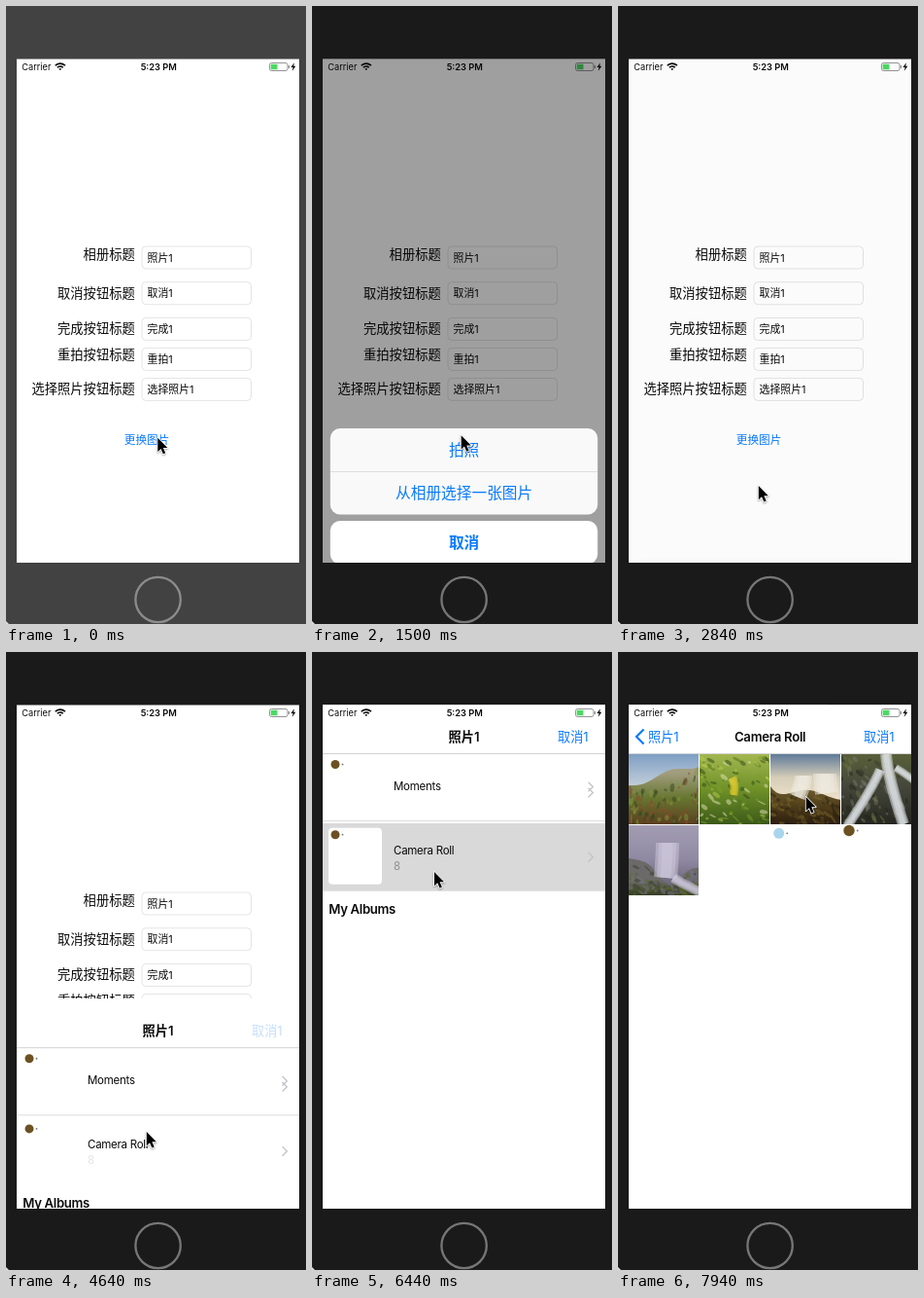
An HTML page with a canvas that plays this animation: 309 px wide and 635 px high, repeating every 8 s.

```html
<!DOCTYPE html>
<html lang="zh">
<head>
<meta charset="utf-8">
<style>
html, body { margin: 0; width: 100%; height: 100%; overflow: hidden; background: #1a1a1a; }
canvas { display: block; width: 309px; height: 635px; }
</style>
</head>
<body>
<canvas id="stage"></canvas>
<script>
const W = 309, H = 635, LOOP = 8000, STEP = 150;
const X0 = 11, Y0 = 54, SW = 291, SH = 518, MID = 156.6;
const CELL = 73, PIC = 72;
const BLUE = '#0a7aff', INK = '#0a0a0a';
const canvas = document.getElementById('stage');
const c = canvas.getContext('2d');
const dpr = window.devicePixelRatio || 1;
canvas.width = W * dpr;
canvas.height = H * dpr;

// Share of the way still to go, critically damped spring
function rest(ms) {
  if (ms <= 0) return 1;
  const w = 0.01826 * ms;
  return (1 + w) * Math.exp(-w);
}

// The screen refreshes in coarse steps
function tick(t) {
  const from = t < 2840 ? 0 : t < 4640 ? 2840 : 4640;
  return from === 2840 ? from : from + Math.floor((t - from) / STEP) * STEP;
}

const MOVES = [
  { at: 0, ms: 300, x: 153.7, y: 441.3 },
  { at: 1500, ms: 450, x: 144.8, y: 493 },
  { at: 4640, ms: 600, x: 130.5, y: 286.5 },
  { at: 5390, ms: 450, x: 126, y: 226 },
  { at: 7340, ms: 600, x: 193.7, y: 149 }
];

function pointerAt(t) {
  let x = 156.3, y = 443.8;
  for (const m of MOVES) {
    const p = Math.min(1, Math.max(0, (t - m.at) / m.ms));
    const e = p * p * (3 - 2 * p);
    x += (m.x - x) * e;
    y += (m.y - y) * e;
  }
  return [x, y];
}

function text(s, x, y, size, { color = INK, weight = 400, align = 'left', gap = 0, alpha = 1 } = {}) {
  c.save();
  c.globalAlpha *= alpha;
  c.font = `${weight} ${size}px Inter, "Noto Sans CJK SC", "Noto Sans CJK", sans-serif`;
  c.letterSpacing = gap + 'px';
  c.textAlign = align;
  c.fillStyle = color;
  c.fillText(s, x, y + size * 0.37);
  c.restore();
}

function rect(x, y, w, h, color) {
  c.fillStyle = color;
  c.fillRect(x, y, w, h);
}

function card(x, y, w, h, r, fill, stroke) {
  c.beginPath();
  c.roundRect(x, y, w, h, r);
  if (fill) {
    c.fillStyle = fill;
    c.fill();
  }
  if (stroke) {
    c.strokeStyle = stroke;
    c.lineWidth = 0.9;
    c.stroke();
  }
}

function disc(x, y, r, color) {
  c.beginPath();
  c.arc(x, y, r, 0, 7);
  c.fillStyle = color;
  c.fill();
}

function arc(x, y, r, a, b, width, color) {
  c.beginPath();
  c.arc(x, y, r, a, b);
  c.lineWidth = width;
  c.strokeStyle = color;
  c.stroke();
}

function trace(pts) {
  c.beginPath();
  for (let i = 0; i < pts.length; i += 2) c.lineTo(pts[i], pts[i + 1]);
}

function poly(color, ...pts) {
  trace(pts);
  c.fillStyle = color;
  c.fill();
}

// An angle bracket: dir 1 points right, -1 left
function chevron(x, y, size, dir, width, color) {
  trace([x - dir * size, y - size, x, y, x - dir * size, y + size]);
  c.strokeStyle = color;
  c.lineWidth = width;
  c.stroke();
}

function seeded(n) {
  return () => (n = (n * 16807) % 2147483647) / 2147483647;
}

function device(active) {
  rect(0, 0, W, H, active ? '#1a1a1a' : '#424242');
  arc(MID, 610, 23.2, 0, 7, 2.3, active ? '#777' : '#8c8c8c');
  poly('#ddd', 0, H - 3, 3, H, 0, H);
}

function statusBar() {
  text('Carrier', 16.3, 62.5, 9.2);
  text('5:23 PM', MID + 0.7, 62.5, 9.3, { weight: 600, align: 'center' });
  for (const r of [1, 4, 6.9]) arc(55.8, 66, r, -Math.PI * 0.76, -Math.PI * 0.24, 1.7, INK);
  card(271.5, 58.5, 18.5, 8, 2, null, '#8a8a8a');
  rect(272.7, 59.7, 6.8, 5.6, '#4cd964');
  rect(290.8, 61, 1.2, 3, '#8a8a8a');
  poly(INK, 297, 58.3, 293.4, 63, 295.6, 63, 294.8, 66.8, 298.4, 61.8, 296.2, 61.8);
}

const FIELDS = [
  { label: '相册标题', value: '照片1', lift: 3.5 },
  { label: '取消按钮标题', value: '取消1', lift: 0 },
  { label: '完成按钮标题', value: '完成1', lift: 1 },
  { label: '重拍按钮标题', value: '重拍1', lift: 4.5 },
  { label: '选择照片按钮标题', value: '选择照片1', lift: 1 }
];

function form(pressed) {
  rect(X0, Y0, SW, SH, '#fff');
  let y = 258.5;
  FIELDS.forEach(({ label, value, lift }, i) => {
    text(label, 132.8, y - lift, 13.3, { align: 'right' });
    card(140, y - 11.5, 112.5, 23, 4, null, 'rgba(0,0,0,.12)');
    text(value, 145.5, y, 10.9);
    y += i < 2 ? 36.7 : 31;
  });
  text('更换图片', 121.8, 446, 11.65, { color: BLUE, alpha: pressed ? 0.2 : 1 });
}

function sheet(shift, pressed) {
  const x = 18.8, w = 275.4, row = 44.2, top = 425 + shift;
  card(x, top, w, row * 2, 10, '#f9f9f9');
  if (pressed) card(x, top + row, w, row, [0, 0, 10, 10], '#e6e6e6');
  rect(x, top + row, w, 0.8, '#d6d6d8');
  card(x, top + 95, w, row, 10, '#fff');
  const style = { color: BLUE, align: 'center' };
  text('拍照', MID, top + 22, 15.7, style);
  text('从相册选择一张图片', MID, top + 22 + row, 15.7, style);
  text('取消', MID, top + 117, 15.7, { ...style, weight: 600 });
}

function avatar(x, y, r, color) {
  disc(x, y, r, color);
  disc(x + r + 3, y, 0.9, '#777');
}

function album(y, name) {
  card(17, y + 5, 55, 58, 4, '#fff');
  avatar(24, y + 12, 4.5, '#6b5122');
  text(name, 84, y + 28, 11.5, { gap: -0.27 });
  chevron(289.4, y + 35, 4.8, 1, 1.3, '#c3c3c8');
}

function albums(picked, shown) {
  rect(X0, Y0, SW, SH, '#fff');
  rect(X0, 173.2, SW, 0.9, '#d8d8da');
  if (picked) rect(X0, 176, SW, 69.7, '#d9d9d9');
  album(103.5 + 6, '');
  album(103.5, '');
  rect(X0, 105, SW, 0, '#fff');
  text('Moments', 84, 137.7, 11.5, { gap: -0.27 });
  album(175.7, 'Camera Roll');
  text('8', 84, 219.7, 11.5, { color: '#929292', alpha: shown });
  text('My Albums', 17.3, 264, 13.2, { weight: 600, gap: -0.35 });
}

function fillDown(colors, top) {
  const g = c.createLinearGradient(0, top, 0, PIC);
  colors.forEach((s, i) => g.addColorStop(i / (colors.length - 1), s));
  c.fillStyle = g;
  c.fill();
}

// Sky, streams of water as soft strokes, and land below a ridge with seeded dabs
function scene({ sky, land, ridge, dabs, seed, lean = 0, streams = [], foam }) {
  c.beginPath();
  c.rect(0, 0, PIC, PIC);
  fillDown(sky, 0);
  c.beginPath();
  c.moveTo(0, PIC);
  for (let x = 0; x <= PIC; x += 3) c.lineTo(x, ridge(x));
  c.lineTo(PIC, PIC);
  fillDown(land, ridge(PIC / 2));
  const r = seeded(seed);
  c.globalAlpha = 0.5;
  for (let i = 0; i < 90; i++) {
    const x = r() * PIC, top = ridge(x) + 3;
    c.beginPath();
    c.ellipse(x, top + r() * (PIC - top), 1 + r() * 4, 0.7 + r() * 1.6, lean + r(), 0, 7);
    c.fillStyle = dabs[i % dabs.length];
    c.fill();
  }
  c.strokeStyle = foam;
  for (const [x, y, bend, dx, dy, width] of streams) {
    for (const k of [1, 0.75, 0.45]) {
      c.beginPath();
      c.moveTo(x, y);
      c.quadraticCurveTo(x + bend, y + dy / 3, x + dx, y + dy);
      c.lineWidth = width * k;
      c.stroke();
    }
  }
  c.globalAlpha = 1;
}

const SCENES = [
  {
    sky: ['#7f9fc4', '#c9d3dc', '#dcd9cc'], land: ['#a29d80', '#66762f', '#5c3f20'],
    ridge: x => 32 - x * 0.3 + 3 * Math.sin(x / 9),
    dabs: ['#84963f', '#35461f', '#8a4a2c'], seed: 41, lean: 1.2
  },
  {
    sky: ['#b9c765', '#6f8f2a'], land: ['#a3b750', '#6f9128', '#3c5a19'],
    ridge: () => 0,
    dabs: ['#4e721b', '#b5cb4c', '#2f4816', '#e2e6b4', '#7fa02c'], seed: 97,
    streams: [[34, 24, 3, 1, 18, 9]], foam: '#dcc82c'
  },
  {
    sky: ['#5f7b99', '#d6cdb8', '#efe3cb', '#cfc8b8'], land: ['#6a5a2e', '#4d3a18', '#2c1f0e'],
    ridge: x => 42 + 5 * Math.cos(x / 12) - 14 * Math.exp(-x / 9),
    dabs: ['#7d6a2c', '#2a2110', '#5c4a1e'], seed: 23,
    streams: [[34, 22, 0, -6, 22, 18], [56, 20, 0, 2, 20, 24]], foam: '#f0ece2'
  },
  {
    sky: ['#4b5233', '#29281f'], land: ['#59603a', '#43453a', '#262720'],
    ridge: () => 0,
    dabs: ['#6a7040', '#23241b', '#3a3d2c', '#787a6c'], seed: 61, lean: 0.6,
    streams: [[46, 0, 2, 18, 72, 12], [40, 16, -8, -34, 58, 10], [56, 14, 8, 20, 14, 8]], foam: '#e4e8ec'
  },
  {
    sky: ['#a39db4', '#8f88a2', '#5c5866'], land: ['#6c6a68', '#4d5636', '#35401f'],
    ridge: x => 34 + 22 * Math.exp(-(((x - 42) / 16) ** 2)) + x / 8,
    dabs: ['#56682f', '#3a3c34', '#77728a'], seed: 11,
    streams: [[40, 18, 0, -2, 36, 24], [46, 54, 8, 30, 16, 10]], foam: '#cfc9de'
  }
];

function grid() {
  rect(X0, Y0, SW, SH, '#fff');
  SCENES.forEach((s, i) => {
    c.save();
    c.translate(X0 + (i % 4) * CELL, 105 + Math.floor(i / 4) * CELL);
    c.beginPath();
    c.rect(0, 0, PIC, PIC);
    c.clip();
    scene(s);
    c.restore();
  });
  avatar(165.7, 186.3, 5.5, '#a9d5ee');
  avatar(238, 183.5, 5.7, '#6b5122');
}

function navBar(left, shown) {
  const p = 1 - left, y = 87, size = 13.2;
  const title = { weight: 600, align: 'center' };
  rect(X0, Y0, SW, 50, '#fff');
  rect(X0, 104, SW, 0.9, '#cfcfd2');
  text('照片1', MID - 109 * p, y, size, { ...title, alpha: left });
  c.save();
  c.globalAlpha = p;
  chevron(19, y, 7.5, -1, 2.2, BLUE);
  text('照片1', 31 + 109 * left, y, size, { color: BLUE });
  text('Camera Roll', MID + 120 * left, y, size, { ...title, gap: -0.27 });
  c.restore();
  text('取消1', 253, y, size, { color: BLUE, alpha: shown });
}

function picker(t) {
  const rise = rest(t - 4562);
  const shown = Math.min(1, 0.24 + (t - 4640) / 400);
  const left = rest(t - 6515);
  c.save();
  c.translate(0, SH * rise);
  c.save();
  c.translate(-SW * 0.3 * (1 - left), 0);
  albums(t >= 6440, shown);
  c.restore();
  if (left < 1) {
    rect(X0, Y0, SW, SH, `rgba(0,0,0,${0.1 * (1 - left)})`);
    c.save();
    c.translate(SW * left, 0);
    grid();
    c.restore();
  }
  navBar(left, shown);
  c.restore();
}

function pointer([x, y]) {
  c.save();
  c.translate(x, y);
  c.scale(0.93, 0.93);
  trace([0, 0, 0, 15.2, 3.5, 12, 6, 17.8, 8.5, 16.7, 6, 11.1, 10.8, 11.1]);
  c.closePath();
  c.lineJoin = 'round';
  c.shadowColor = 'rgba(0,0,0,.35)';
  c.shadowBlur = 2 * dpr;
  c.shadowOffsetY = dpr;
  c.strokeStyle = '#fff';
  c.lineWidth = 1.8;
  c.stroke();
  c.shadowColor = 'transparent';
  c.fillStyle = '#000';
  c.fill();
  c.restore();
}

function draw(t) {
  c.setTransform(dpr, 0, 0, dpr, 0, 0);
  device(t >= 900);
  c.save();
  c.beginPath();
  c.rect(X0, Y0 + 0.6, SW, SH - 0.6);
  c.clip();
  form(t >= 900 && t < 1500);
  if (t >= 4640) picker(t);
  statusBar();
  if (t >= 1350 && t < 4640) {
    const hidden = t < 2550 ? rest(t - 1254) : 1 - rest(t - 2556);
    rect(X0, Y0, SW, SH, `rgba(0,0,0,${0.4 * (1 - hidden)})`);
    sheet(147 * hidden, t >= 2550);
  }
  c.restore();
  pointer(pointerAt(t));
}

function loop() {
  draw(tick(performance.now() % LOOP));
  requestAnimationFrame(loop);
}
loop();
</script>
</body>
</html>
```
